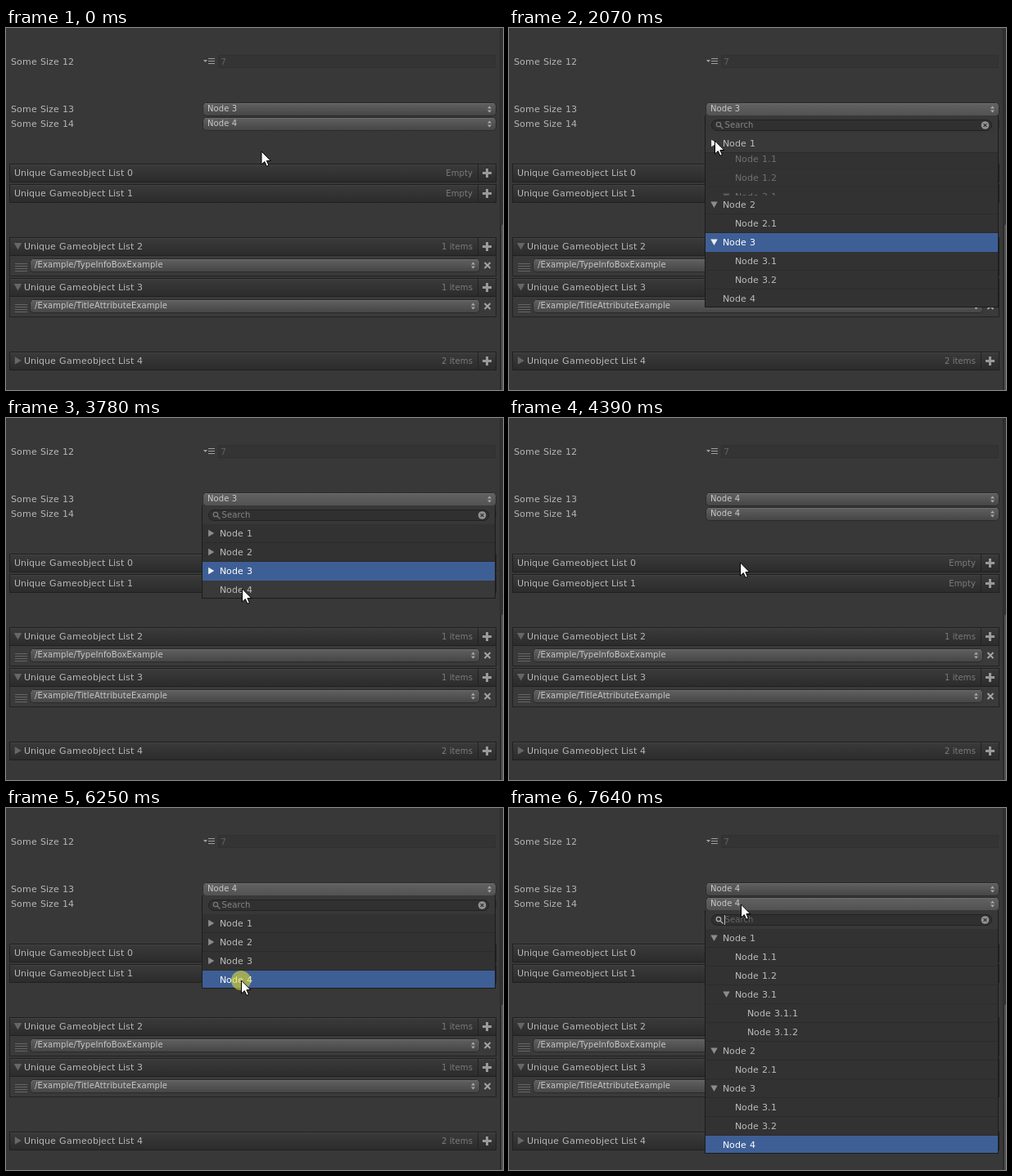
Animation of 607x443 px, one loop 8 s. Source, as an HTML page with a canvas:

```html
<!DOCTYPE html>
<html lang="en">
<head>
<meta charset="utf-8">
<title>Tree dropdown</title>
<style>
html, body { margin: 0; width: 100%; height: 100%; overflow: hidden; background: #383838; }
canvas { display: block; width: 607px; height: 443px; }
</style>
</head>
<body>
<canvas id="stage"></canvas>
<script>
const W = 607, H = 443, LOOP = 8000, STEP = 77.15, LAG = 22, ROW = 23;
const canvas = document.getElementById('stage');
const ctx = canvas.getContext('2d');
const ratio = window.devicePixelRatio || 1;
canvas.width = W * ratio;
canvas.height = H * ratio;
ctx.scale(ratio, ratio);

// Pointer path: time, x, y
const path = [
  [287, 311.5, 151], [672, 316, 94], [1290, 316, 94], [1830, 251, 138],
  [2138, 251, 138], [2447, 250, 160], [2832, 250, 160], [2910, 249, 180],
  [3373, 249, 180], [3681, 288, 209], [4144, 288, 209], [4376, 282, 177],
  [4761, 286, 104], [4839, 286, 104], [4916, 288, 97], [5687, 288, 97],
  [6150, 287, 211], [6305, 287, 211], [6767, 283, 118]
];
const clicks = [[840, 920], [1910, 1990], [2620, 2700], [3150, 3230],
  [3700, 3780], [5010, 5090], [6250, 6400], [7320, 7400]];
const menus = [
  { open: 990, blur: 1370, close: 3850, top: 107, selected: 'Node 3' },
  { open: 5170, blur: 5790, close: 6480, top: 107, selected: 'Node 4' },
  { open: 7570, blur: LOOP, close: LOOP, top: 125, selected: 'Node 4', fresh: true }
];
const tree = [
  { name: 'Node 1', fold: 1985, kids: [['Node 1.1', 1], ['Node 1.2', 1], ['Node 3.1', 1, true], ['Node 3.1.1', 2], ['Node 3.1.2', 2]] },
  { name: 'Node 2', fold: 2678, kids: [['Node 2.1', 1]] },
  { name: 'Node 3', fold: 3218, kids: [['Node 3.1', 1], ['Node 3.2', 1]] },
  { name: 'Node 4', kids: [] }
];

const clamp = v => Math.min(1, Math.max(0, v));

function rect(x, y, w, h, color) {
  ctx.fillStyle = color;
  ctx.fillRect(x, y, w, h);
}

function shade(y, h, from, to) {
  const g = ctx.createLinearGradient(0, y, 0, y + h);
  g.addColorStop(0, from);
  g.addColorStop(1, to);
  return g;
}

function pill(x, y, w, h, r, fill, stroke) {
  ctx.beginPath();
  ctx.roundRect(x + .5, y + .5, w - 1, h - 1, r);
  ctx.fillStyle = fill;
  ctx.fill();
  ctx.strokeStyle = stroke;
  ctx.lineWidth = 1;
  ctx.stroke();
}

// Labels use whole-pixel advances, as hinted interface text does.
function text(str, x, middle, color) {
  ctx.font = '11px "DejaVu Sans", sans-serif';
  ctx.letterSpacing = '0px';
  ctx.textAlign = 'left';
  ctx.fillStyle = color;
  for (const ch of str) {
    ctx.fillText(ch, x, middle + 4);
    x += Math.round(ctx.measureText(ch).width + .01);
  }
}

function smallText(str, x, middle, color, align = 'left') {
  ctx.font = '10px "DejaVu Sans", sans-serif';
  ctx.letterSpacing = '.1px';
  ctx.textAlign = align;
  ctx.fillStyle = color;
  ctx.fillText(str, x, middle + 3);
}

function polygon(points, color) {
  ctx.beginPath();
  points.forEach(([x, y]) => ctx.lineTo(x, y));
  ctx.closePath();
  ctx.fillStyle = color;
  ctx.fill();
}

function triangle(x, y, r, down, color) {
  polygon(down
    ? [[x - r, y - r * .85], [x + r, y - r * .85], [x, y + r * .95]]
    : [[x - r * .8, y - r], [x + r * .9, y], [x - r * .8, y + r]], color);
}

function cross(x, y, r, color, width) {
  ctx.beginPath();
  ctx.moveTo(x - r, y - r);
  ctx.lineTo(x + r, y + r);
  ctx.moveTo(x + r, y - r);
  ctx.lineTo(x - r, y + r);
  ctx.strokeStyle = color;
  ctx.lineWidth = width;
  ctx.stroke();
}

function popup(label, x, y, w, focused) {
  const fill = focused ? shade(y, 15, '#626262', '#525252') : shade(y, 15, '#606060', '#464646');
  pill(x - 1, y - 1, w + 2, 17, 4, fill, '#2a2a2a');
  rect(x + 2, y, w - 4, 1, '#6c6c6c');
  smallText(label, x + 5, y + 7, '#c8c8c8');
  const ax = x + w - 7.5;
  polygon([[ax - 2.5, y + 6.5], [ax, y + 3.5], [ax + 2.5, y + 6.5]], '#aaa');
  polygon([[ax - 2.5, y + 8.5], [ax, y + 11.5], [ax + 2.5, y + 8.5]], '#aaa');
}

function list(index, y, count, item) {
  const hasArrow = index > 1;
  if (item) {
    rect(4, y, 595, 48, '#222');
    rect(5, y + 23, 593, 24, '#3a3a3a');
  }
  rect(4, y, 595, 23, '#202020');
  rect(5, y + 1, 593, 21, shade(y, 23, '#3b3b3b', '#2b2b2b'));
  rect(5, y + 1, 593, 1, '#424242');
  rect(576, y + 1, 1, 21, '#222');
  if (hasArrow) triangle(14.5, y + 11, 4.7, !!item, '#666');
  text('Unique Gameobject List ' + index, hasArrow ? 22 : 10, y + 11, '#b6b6b6');
  smallText(count, 570, y + 12, '#7b7b7b', 'right');
  rect(582, y + 10, 11, 3, '#9a9a9a');
  rect(586, y + 6, 3, 11, '#9a9a9a');
  if (!item) return;
  for (let i = 0; i < 4; i++) rect(11, y + 32 + i * 3, 15, 1, '#666');
  popup(item, 30, y + 27, 548);
  cross(588, y + 34.5, 3.5, '#a4a4a4', 2);
}

function inspector(t, openMenu) {
  rect(0, 0, W, H, '#383838');
  rect(603, 0, 1, H, '#2b2b2b');
  rect(604, 0, 3, H, '#313131');
  pill(604, 239, 8, 220, 3, '#545454', '#2a2a2a');

  text('Some Size 12', 6, 41, '#b6b6b6');
  polygon([[241, 39], [246, 39], [243.5, 42]], '#a0a0a0');
  for (let i = 0; i < 3; i++) rect(247, 37 + i * 3, 8, 1, '#a0a0a0');
  rect(259, 33, 339, 16, '#303030');
  rect(260, 34, 337, 14, '#343434');
  text('7', 262, 41, '#626262');

  text('Some Size 13', 6, 99, '#b6b6b6');
  text('Some Size 14', 6, 117, '#b6b6b6');
  popup(t < 3850 ? 'Node 3' : 'Node 4', 241, 92, 357, openMenu && openMenu.top === 107);
  popup('Node 4', 241, 110, 357, openMenu && openMenu.top === 125);

  list(0, 166, 'Empty');
  list(1, 191, 'Empty');
  list(2, 256, '1 items', '/Example/TypeInfoBoxExample');
  list(3, 306, '1 items', '/Example/TitleAttributeExample');
  list(4, 396, '2 items');
}

function search(y, focused, dim) {
  rect(240, y, 357, 23, '#383838');
  pill(247, y + 5, 343, 14, 7, '#303030', '#222');
  const iconColor = focused ? '#b0b0b0' : '#777';
  ctx.strokeStyle = iconColor;
  ctx.lineWidth = 1.3;
  ctx.beginPath();
  ctx.arc(256, y + 11, 2.7, 0, 7);
  ctx.moveTo(258, y + 13);
  ctx.lineTo(261.5, y + 16.5);
  ctx.stroke();
  smallText('Search', 263.5, y + 12, dim ? '#666' : '#858585');
  if (focused) rect(263, y + 6, 1, 12, '#bbb');
  ctx.beginPath();
  ctx.arc(581.5, y + 12, 4.8, 0, 7);
  ctx.fillStyle = '#929292';
  ctx.fill();
  cross(581.5, y + 12, 1.9, '#303030', 1.3);
}

function row(name, depth, y, { arrow, selected, hover }) {
  rect(240, y, 357, ROW, selected ? '#3e5f96' : hover ? '#393939' : '#323232');
  if (!selected) rect(240, y + ROW - 1, 357, 1, '#2b2b2b');
  const x = 261 + depth * 15;
  if (arrow) triangle(x - 10.5, y + 11, 4.2, arrow === 'down', selected || hover ? '#eee' : '#8c8c8c');
  text(name, x, y + 11, selected ? '#fff' : '#bcbcbc');
}

function dropdown(menu, t, s, pointer) {
  const openness = node => menu.fresh || !node.fold ? 1 : 1 - clamp((s - node.fold) / 139);
  const top = menu.top;
  const body = tree.reduce((sum, node) => sum + ROW * (1 + node.kids.length * openness(node)), 0);
  const height = Math.round(22 + body);
  rect(239, top, 359, height, '#1c1c1c');
  search(top, t < menu.blur, t >= menu.open + 70 && t < menu.blur);

  ctx.save();
  ctx.beginPath();
  ctx.rect(240, top + 23, 357, height - 24);
  ctx.clip();
  let y = top + 23;
  for (const node of tree) {
    const open = openness(node);
    const folding = node.fold && !menu.fresh && s >= node.fold;
    row(node.name, 0, y, {
      arrow: node.kids.length && (folding ? 'right' : 'down'),
      selected: node.name === menu.selected,
      hover: pointer.y >= y && pointer.y < y + ROW
    });
    y += ROW;
    const area = Math.round(node.kids.length * ROW * open);
    if (area > 0) {
      ctx.save();
      ctx.beginPath();
      ctx.rect(240, y, 357, area);
      ctx.clip();
      rect(240, y, 357, area, '#323232');
      ctx.globalAlpha = open;
      node.kids.forEach(([name, depth, parent], i) => {
        const ky = y + i * ROW - Math.round(8 * (1 - open));
        row(name, depth, ky, {
          arrow: parent && 'down',
          hover: open === 1 && pointer.y >= ky && pointer.y < ky + ROW
        });
      });
      ctx.restore();
    }
    y += area;
  }
  ctx.restore();
}

function pointerAt(s) {
  const i = path.findIndex(p => p[0] > s);
  const [t1, x1, y1] = i < 0 ? path.at(-1) : path[i];
  if (i <= 0) return { x: x1, y: y1 };
  const [t0, x0, y0] = path[i - 1];
  const u = (s - t0) / (t1 - t0), e = u * u * (3 - 2 * u);
  return { x: x0 + (x1 - x0) * e, y: y0 + (y1 - y0) * e };
}

function drawPointer({ x, y }, pressed) {
  if (pressed) {
    ctx.beginPath();
    ctx.arc(x, y, 12, 0, 7);
    ctx.fillStyle = 'rgba(225, 220, 50, .6)';
    ctx.fill();
  }
  ctx.save();
  ctx.translate(x + .5, y);
  polygon([[0, 0], [0, 16], [3.8, 12.6], [6.4, 18.3], [8.9, 17.2], [6.4, 11.5], [11.3, 11.5]], '#fff');
  ctx.strokeStyle = '#000';
  ctx.lineWidth = 1;
  ctx.stroke();
  ctx.restore();
}

function draw(now) {
  const t = now % LOOP;
  const s = Math.floor((t + LAG) / STEP) * STEP - LAG;
  const menu = menus.find(m => t >= m.open && t < m.close);
  const pointer = pointerAt(s);
  inspector(t, menu);
  if (menu) dropdown(menu, t, s, pointer);
  drawPointer(pointer, clicks.some(([from, to]) => t >= from && t < to));
}

let start;
function tick(now) {
  start ??= now;
  draw(now - start);
  requestAnimationFrame(tick);
}
draw(0);
requestAnimationFrame(tick);
</script>
</body>
</html>
```
